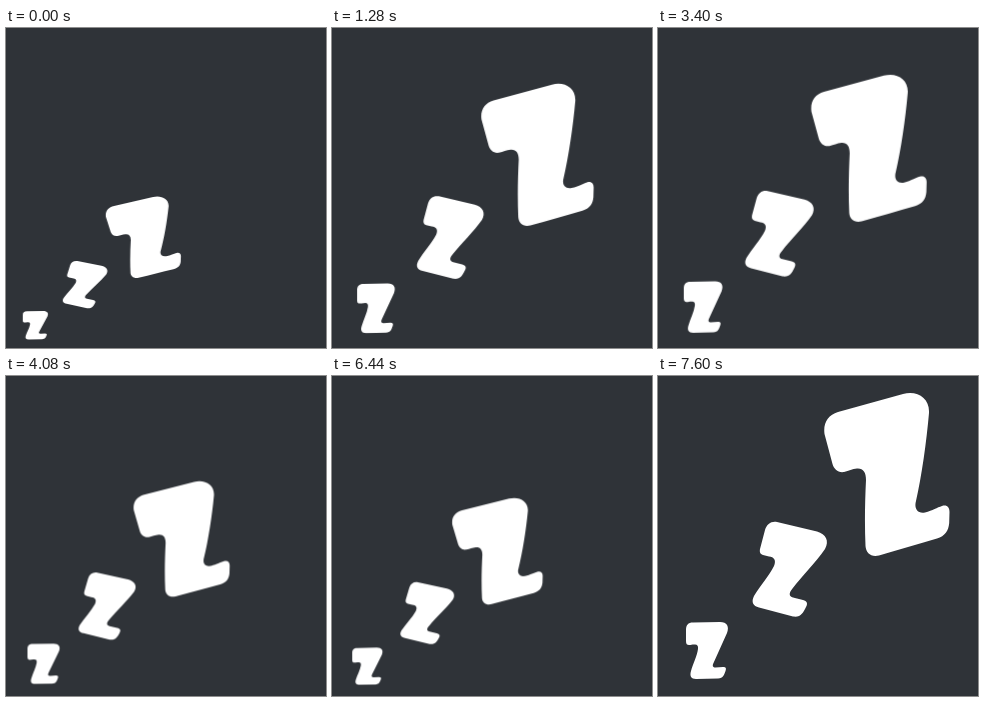
An HTML page for the animation above (8000 ms loop, 320 by 320 pixels).

```html
<!DOCTYPE html>
<html lang="en">
<head>
<meta charset="utf-8">
<title>Zzz</title>
<style>
  html, body {
    margin: 0;
    width: 100%;
    height: 100%;
    overflow: hidden;
    background: #2f3338;
  }
  svg {
    display: block;
    width: 100%;
    height: 100%;
  }
  .snore {
    fill: #fff;
    transform-origin: 0 320px;
    animation: breathe 8s cubic-bezier(.3333, 0, .6667, 1) infinite;
  }
  /* in, hold, out, hold, in again, hold, then a hard cut */
  @keyframes breathe {
    0%, .06%, 65%, 72.15% { transform: scale(.6, .5); }
    23.9%, 33.6%, 94.85%, 100% { transform: scale(1, 1); }
  }
</style>
</head>
<body>
<svg viewBox="0 0 320 320">
  <g class="snore">
    <path d="M180 36L245 18C259 14 272 22 271 37C268.5 66 263.5 101 258 125C256 132 259 138 267 136.5C275 134.5 279 131.5 284 130C289 128.5 291.5 131.5 291.5 136L291.2 147C290.5 155 287 160 279 162.5C260 168 240 174 221 179.5C213 181.5 208 177 207.5 170C206.5 148 207 125 208 104C208 96 205 92 199 92.5C194 93 191 95 186 96C180 97 176 93 174.5 88L166.5 58C165 47 170 39 180 36Z"/>
    <path d="M119 146L159 155.5C168 158 171.5 165 167 173C158 186 144 200 134.5 212.5C130.5 217 131 220.5 135 221.5L145 224C149 225 150 227.5 148 231C145 237 143 241.5 135 240.5L101 231.5C95 230 93 226 96 220C102 210 111 200 116 190C118.5 184 116 181 111 180.5L105 179C102 178 101.5 176 102 173L107 154C109 148 113 145 119 146Z"/>
    <path d="M35 246.5L62 246C69 246 71.5 250.5 69 257L55.5 287C54 290 55 291.5 57.5 291.5L65 291C68 291 68.5 292.5 67.5 295C66 299 65.5 302 60 302.5L38 303C33 303 31.5 300 33 295C35 288 39 280 40 273C40.5 269.5 39 268 36 268.5C34 268.5 33 269 31 269C29 269 28 268 28 265L28 254C28 249 30 246.5 35 246.5Z"/>
  </g>
</svg>
</body>
</html>
```
